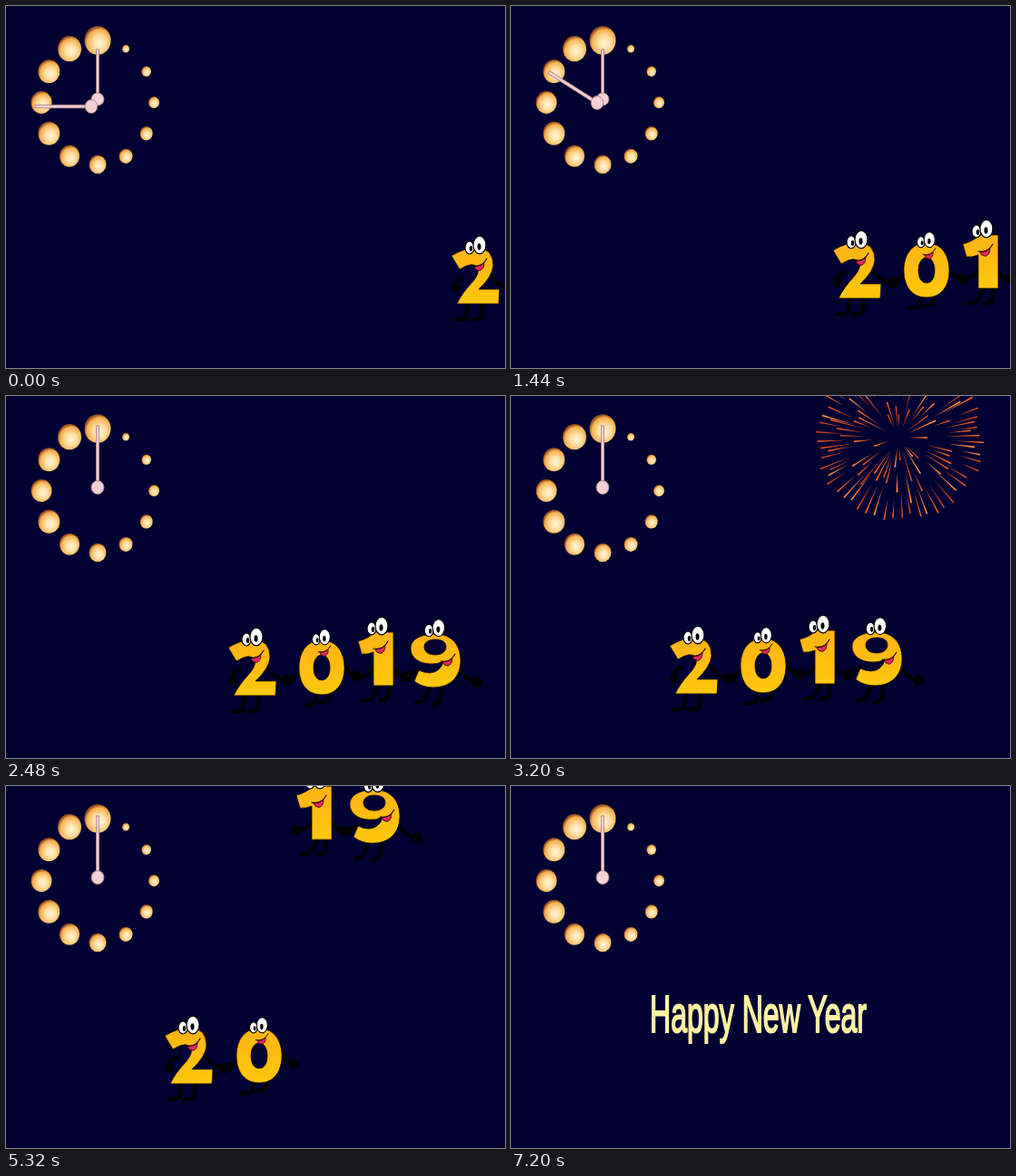
An HTML page with a canvas that plays this animation: 550 by 400 pixels, repeating every 8 s.

```html
<!DOCTYPE html>
<html lang="en">
<head>
<meta charset="utf-8">
<title>Happy New Year</title>
<style>
html, body { margin: 0; width: 100%; height: 100%; overflow: hidden; background: #000033; }
canvas, svg { position: absolute; left: 0; top: 0; width: 550px; height: 400px; }
.limb { fill: none; stroke: #000; stroke-width: 4.2; stroke-linecap: round; stroke-linejoin: round; }
.body { fill: url(#gold); stroke: #1c0e00; stroke-width: .8; fill-rule: evenodd; }
.white { fill: #fff; stroke: #000; stroke-width: 1.2; }
.tongue { fill: #e2275f; stroke: #300; stroke-width: .8; stroke-linejoin: round; }
.smile { fill: none; stroke: #200; stroke-width: 1.1; stroke-linecap: round; }
.hand { fill: #f5d0d3; stroke: #a4787f; stroke-width: .8; }
#greeting { font: 32.1px "Liberation Sans", Arial, sans-serif; fill: #fff2a2; stroke: #fff2a2; stroke-width: 1.2; }
</style>
</head>
<body>
<canvas id="sky" width="550" height="400"></canvas>
<svg viewBox="0 0 550 400">
  <defs>
    <linearGradient id="gold" x2="0" y2="1">
      <stop offset="0" stop-color="#ffb313"/><stop offset="1" stop-color="#ffc80c"/>
    </linearGradient>
    <radialGradient id="ball" cx=".57" cy=".6" r=".58">
      <stop offset="0" stop-color="#fff6e0"/><stop offset=".4" stop-color="#ffdfa2"/>
      <stop offset=".82" stop-color="#f5b050"/><stop offset="1" stop-color="#9a4c1c"/>
    </radialGradient>
    <g id="two">
      <path class="limb" d="M188 300Q180 302 179 311M220 299Q225 309 239 312M193 329L191 345L179 347M209 329L207 345L196 347"/>
      <circle cx="180" cy="312" r="5"/><circle cx="240" cy="312" r="6"/>
      <path class="body" d="M175 276Q190 267 203 267Q221 268 221 287Q220 299 205 313H228L227 329H181Q186 318 199 304Q206 295 204 290Q200 281 184 291Z"/>
      <g class="face" data-face="201,266,1,206,285"></g>
    </g>
    <g id="zero">
      <path class="limb" d="M255 303L244 311M302 293Q305 303 314 307M273 327L269 339L259 340M287 326L285 335L276 337"/>
      <circle cx="244" cy="311" r="5"/><circle cx="316" cy="307" r="5.5"/>
      <path class="body" d="M278 268C296 268 303 283 303 298C303 316 294 328 278 328C262 328 253 316 253 298C253 283 260 268 278 268ZM278 284C272 284 269 291 269 298C269 306 272 312 278 312C284 312 287 306 287 298C287 291 284 284 278 284Z"/>
      <g class="face" data-face="277,266,.86,281,279"></g>
    </g>
    <g id="one">
      <path class="limb" d="M336 298Q328 309 318 308M356 297Q360 306 370 309M342 318L333 333L323 335M351 318V332L342 335"/>
      <circle cx="318" cy="308" r="5.5"/><circle cx="371" cy="308" r="6"/>
      <path class="body" d="M318 269Q330 266 336 259H357V318H335V281Q328 284 322 283Z"/>
      <g class="face" data-face="339,254,1,343,275"></g>
    </g>
    <g id="nine">
      <path class="limb" d="M384 301L373 308M430 300Q435 310 447 314M398 319L390 335L382 337M410 319L409 335L400 339"/>
      <circle cx="374" cy="307" r="5"/><circle cx="449" cy="314" r="6"/>
      <path class="body" d="M376 277C376 266 389 261 403 261C422 261 431 274 431 290C431 309 419 320 401 320C392 320 385 317 380 313L385 301Q398 307 406 301Q411 297 412 291Q405 295 397 294C383 293 376 286 376 277ZM391 275C391 281 396 284 403 284C411 284 415 280 415 275C415 269 409 267 403 267C396 267 391 270 391 275Z"/>
      <g class="face" data-face="402,256,.97,417,289"></g>
    </g>
  </defs>
  <g id="clock">
    <g id="balls"></g>
    <g class="hand">
      <rect x="99.5" y="46" width="3" height="49"/><circle cx="101" cy="101" r="7"/>
    </g>
    <g id="pointer" class="hand">
      <rect x="-1.8" y="-68" width="3.6" height="62"/><circle r="7.5"/>
    </g>
  </g>
  <g id="crowd">
    <use id="a" href="#two"/><use id="b" href="#zero"/><use id="c" href="#one"/><use id="d" href="#nine"/>
  </g>
  <g id="arrivals"><use href="#two"/><use href="#zero"/></g>
  <text id="greeting" transform="translate(153 272) scale(1 1.78)">Happy New Year</text>
</svg>
<script>
const LOOP = 8000, STEP = 40, TAU = Math.PI * 2;
const el = id => document.getElementById(id);
const place = (id, x, y) => el(id).setAttribute('transform', `translate(${x} ${y})`);
const show = (id, on) => { el(id).style.display = on ? '' : 'none'; };
const clamp = v => Math.max(0, Math.min(1, v));

// Eyes around (x, y) at scale k, smile around (mx, my)
for (const g of document.querySelectorAll('.face')) {
  const [x, y, k, mx, my] = g.dataset.face.split(',').map(Number);
  g.innerHTML = `<g transform="translate(${x} ${y}) scale(${k})">
    <ellipse class="white" cx="-6" cy="1" rx="5" ry="7"/><ellipse class="white" cx="5" cy="-2" rx="7" ry="9.8"/>
    <ellipse cx="-4.5" cy="2" rx="1.7" ry="3"/><ellipse cx="4.5" cy="0" rx="2" ry="3.7"/></g>
    <g transform="translate(${mx} ${my}) scale(${k})">
    <path class="tongue" d="M-6 3Q1 3 5 -1Q5 6 0 7.5Q-5 7 -6 3Z"/><path class="smile" d="M-8 2Q3 4 8 -6"/></g>`;
}

const sizes = [14.5, 4, 5.3, 6, 7, 7.5, 9.5, 11, 12, 11.5, 12, 13];
el('balls').innerHTML = sizes.map((r, i) => {
  const a = i * TAU / 12;
  return `<ellipse cx="${101 + 62 * Math.sin(a)}" cy="${104.5 - 68.5 * Math.cos(a)}" rx="${r}" ry="${r * 1.09}" fill="url(#ball)"/>`;
}).join('');

// Piecewise linear track of [time, value] points
function track(t, points) {
  let [t0, v0] = points[0];
  for (const [t1, v1] of points) {
    if (t < t1) return v0 + (v1 - v0) * (t - t0) / (t1 - t0);
    [t0, v0] = [t1, v1];
  }
  return v0;
}

function random(seed) {
  return () => (seed = (seed * 16807) % 2147483647) / 2147483647;
}

const ctx = el('sky').getContext('2d');

function ray(x, y, a, from, to, width, color) {
  const c = Math.cos(a), s = Math.sin(a);
  ctx.fillStyle = color;
  ctx.beginPath();
  ctx.moveTo(x + c * from, y + s * from);
  ctx.lineTo(x + c * to - s * width, y + s * to + c * width);
  ctx.lineTo(x + c * to + s * width, y + s * to - c * width);
  ctx.fill();
}

function burst(x, y, radius, seed, count, colors, width, tail) {
  const rnd = random(seed);
  for (let i = 0; i < count; i++) {
    const a = (i + rnd() * .7) * TAU / count;
    const reach = i % 2 ? .88 + rnd() * .12 : .25 + rnd() * .65;
    const length = tail * (.6 + rnd() * .6);
    const color = colors[Math.floor(rnd() * colors.length)];
    ray(x, y, a, radius * Math.max(.12, reach - length), radius * reach, width, color);
  }
}

function drawSky(t) {
  ctx.clearRect(0, 0, 550, 400);
  if (t >= 2560 && t < 3760) {
    const p = clamp((t - 2520) / 680);
    burst(427, 46, 96 * (1 - (1 - p) ** 1.7), 77, 112, ['#e4511b', '#f0641e', '#c9431c', '#ff8a3a'], .9, .34);
  }
  if (t >= 3760 && t < 4800) {
    const r = Math.min(75, (t - 3720) * .0865);
    ctx.globalAlpha = 1 - clamp((t - 4600) / 240);
    burst(343, 88, r, 41, 180, ['#fff', '#f7c9a4', '#e9a070', '#cdbde0', '#8d7c98'], .55, .32);
    ctx.globalAlpha = 1;
  }
}

// The pointer ticks from nine to twelve; the dial is narrower than it is high
function drawClock(t) {
  const left = 3 - Math.min(3, Math.floor(t / 800));
  const a = left * TAU / 12;
  place('clock', 0, left ? 2 : 0);
  el('pointer').setAttribute('transform',
    `translate(${101 - 7 * Math.sin(a)} ${109 - 8 * Math.cos(a)}) scale(.91 1) rotate(${-30 * left})`);
}

// Distance travelled after a soft start
function travel(t, speed, ramp) {
  if (t < 0) return 0;
  return speed * (t < ramp ? t * t / (2 * ramp) : t - ramp / 2);
}

function drawCrowd(t) {
  const x = track(t, [[0, 316], [1440, 180], [2480, 70], [3200, 0]]);
  const y = track(t, [[0, 0], [1440, -6], [2480, 2], [3200, 0]]);
  place('crowd', x, y);

  const apart = t >= 3600 ? 1 : 0;
  const rise = travel(t - 3720, .1755, 250);
  place('b', apart, 0);
  place('c', 2 * apart, -rise);
  place('d', 3 * apart, 2 * apart - rise);
  show('crowd', t < 7200);
}

function drawArrivals(t) {
  let x = track(t, [[5320, 550], [5800, 376]]);
  if (t >= 6200) x = 335;
  if (t >= 6640) x = 294;
  el('arrivals').setAttribute('transform', `translate(${x} 111) scale(1.22 2.5) translate(-174 -253)`);
  show('arrivals', t >= 5360 && t < 7200);
}

function draw(now) {
  const t = Math.floor((now % LOOP) / STEP) * STEP;
  drawSky(t);
  drawClock(t);
  drawCrowd(t);
  drawArrivals(t);
  show('greeting', t >= 7200);
}

const start = performance.now();
function tick() {
  draw(performance.now() - start);
  requestAnimationFrame(tick);
}
tick();
</script>
</body>
</html>
```
